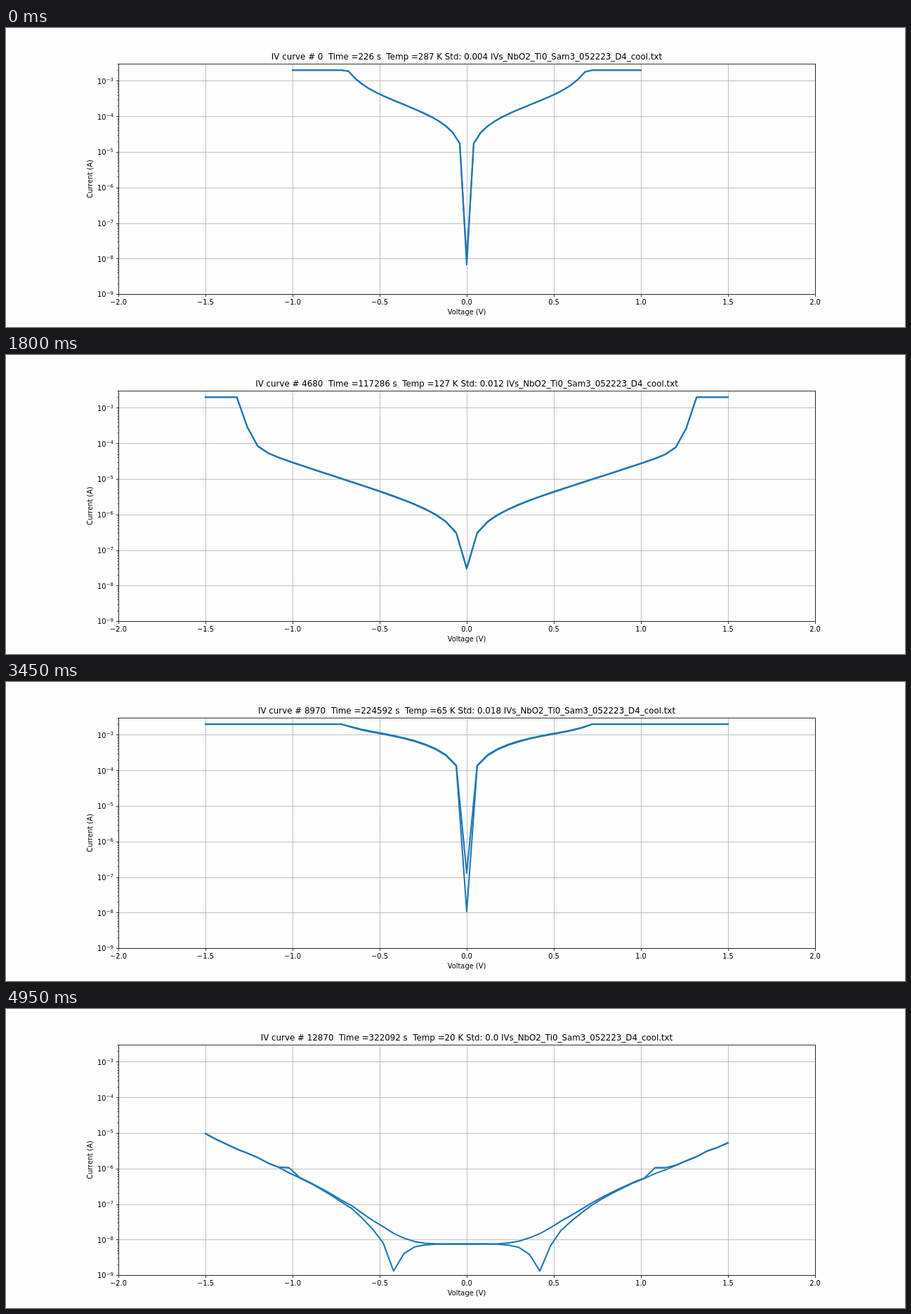
Write an HTML page with a canvas that moves like this. It is 1280 px wide and 427 px high and loops after 5 s.

```html
<!DOCTYPE html>
<html lang="en">
<head>
<meta charset="utf-8">
<title>IV curves</title>
<style>
  html, body { margin: 0; width: 100%; height: 100%; overflow: hidden; background: #fefefe; }
  canvas { display: block; }
</style>
</head>
<body>
<canvas id="plot" width="1280" height="427"></canvas>
<script>
const ctx = document.getElementById('plot').getContext('2d');
const LEFT = 160, RIGHT = 1152, TOP = 51.24, BOTTOM = 380.03;
const DECADE = (BOTTOM - TOP) / (Math.log10(3e-3) + 9);
const COMPLIANCE = Math.log10(2e-3);
const STEP_MS = 50, STEPS = 100;
const FONT = '"DejaVu Sans", sans-serif';

const toX = volts => 656 + 248 * volts;
const toY = logI => BOTTOM - (logI + 9) * DECADE;
const snap = value => Math.round(value) + .5;
const mix = (a, b, u) => a + (b - a) * u;
const noise = seed => {
  const s = Math.sin(seed * 12.9898) * 43758.5453;
  return s - Math.floor(s) - .5;
};

// Device conditions. Currents are log10: logG conductance, gap between the sweeps,
// zeroUp and zeroDown the readings at 0 V. Growth, power, threshold and softness shape the rise.
const fresh = { kelvin: 287, std: .004, logG: -3.365, gap: .006, growth: 2.2, power: 2,
                threshold: .6985, softness: .083, zeroUp: -8.17, zeroDown: -8.05, cold: 0 };
const cooler = { ...fresh, kelvin: 263, std: .014, logG: -3.606, growth: 2.3,
                 threshold: .7235, softness: .042, zeroUp: -7.82, zeroDown: -12 };
const insulating = { ...fresh, kelvin: 168, std: .012, logG: -4.8, gap: .015, growth: 1.7, power: 1.6,
                     threshold: 1.25, softness: .04, zeroUp: -7.51, zeroDown: -7.53 };
const formed = { ...fresh, kelvin: 85, std: .011, logG: -3.24, gap: .185, growth: .12,
                 threshold: .84, softness: .01, zeroUp: -7.46, zeroDown: -8.386 };
const metallic = { ...fresh, kelvin: 65, std: .018, logG: -2.635, gap: .02, growth: -.13, power: 1,
                   threshold: .78, softness: .06, zeroUp: -6.89, zeroDown: -7.97 };
const timeline = [
  { step: 0, ...fresh },
  { step: 12, ...cooler },
  { step: 28, ...insulating },
  { step: 36, ...insulating, kelvin: 127, logG: -5.3 },
  { step: 37, ...formed, kelvin: 122 },
  { step: 44, ...formed },
  { step: 68, ...formed, kelvin: 66, threshold: 1.02 },
  { step: 69, ...metallic },
  { step: 82, ...metallic, kelvin: 20, std: 0, cold: 1 }
];

// Each run sweeps its own voltage range; restarting adds a pause in seconds
const runs = [
  { start: 0, range: 1, pause: 0 },
  { start: 31, range: 1.5, pause: 60 },
  { start: 37, range: 1.8, pause: 117 },
  { start: 67, range: 2, pause: 116 },
  { start: 69, range: 1.5, pause: 116 }
];

function stateAt(step) {
  let i = 0;
  while (i < timeline.length - 2 && timeline[i + 1].step <= step) i++;
  const a = timeline[i], b = timeline[i + 1];
  const u = Math.min(1, (step - a.step) / (b.step - a.step));
  return Object.fromEntries(Object.keys(a).map(key => [key, mix(a[key], b[key], u)]));
}

function warmLog(state, down, volts) {
  if (!volts) return down ? state.zeroDown : state.zeroUp;
  const v = Math.abs(volts);
  const rise = state.growth * v ** state.power + Math.exp((v - state.threshold) / state.softness);
  const split = down ? state.gap * (1 - .4 * v) : 0;
  const skew = volts < 0 ? .03 * v : 0;
  return Math.min(COMPLIANCE, state.logG + Math.log10(v) + rise / Math.LN10 - split + skew);
}

// Power law with an exponential tail above 1 V, offset by a displacement current
// that adds to one sweep and cancels the other
function coldLog(down, volts, seed) {
  const v = Math.abs(volts), displacement = 7.5e-9;
  const [scale, power] = volts < 0 ? [6.9e-7, 5.2] : [4.8e-7, 4.8];
  const shape = v < 1 ? v ** power : Math.exp(power * (v - 1));
  const current = scale * shape * (1 + .08 * noise(seed));
  if (down) return Math.log10(Math.max(1.3e-9, Math.abs(current - displacement)));
  const rangeSwitch = current > 6.5e-7 && current < 1.05e-6;
  return Math.log10(rangeSwitch ? 1.05e-6 : current + displacement);
}

function line(x1, y1, x2, y2, color, width = .8) {
  ctx.strokeStyle = color;
  ctx.lineWidth = width;
  ctx.beginPath();
  ctx.moveTo(x1, y1);
  ctx.lineTo(x2, y2);
  ctx.stroke();
}

function text(string, x, y, size = 9.88, align = 'center') {
  ctx.font = `${size}px ${FONT}`;
  ctx.textAlign = align;
  ctx.fillStyle = '#000';
  ctx.fillText(string, x, y);
}

function drawGridAndTicks() {
  const left = snap(LEFT), right = snap(RIGHT), top = snap(TOP), bottom = snap(BOTTOM);
  for (let v = -2; v <= 2; v += .5) {
    const x = snap(toX(v));
    line(x, top, x, bottom, '#b0b0b0');
    line(x, bottom, x, bottom + 3.5, '#000');
    text(v.toFixed(1).replace('-', '−'), toX(v), 395);
  }
  for (let e = -9; e <= -3; e++) {
    const y = snap(toY(e));
    line(left, y, right, y, '#b0b0b0');
    line(left - 3.5, y, left, y, '#000');
    text('10', 142.6, toY(e) + 4.3, 9.88, 'right');
    text('−' + -e, 153, toY(e) + .5, 6.92, 'right');
    for (let m = 2; m <= (e === -3 ? 3 : 9); m++) {
      const minor = snap(toY(e + Math.log10(m)));
      line(left - 2, minor, left, minor, '#000', .6);
    }
  }
}

function drawFrame() {
  ctx.strokeStyle = '#000';
  ctx.lineWidth = .8;
  ctx.strokeRect(snap(LEFT), snap(TOP), RIGHT - LEFT, snap(BOTTOM) - snap(TOP));
}

function drawCurves(step, state, range) {
  ctx.save();
  ctx.beginPath();
  ctx.rect(LEFT, TOP, RIGHT - LEFT, BOTTOM - TOP);
  ctx.clip();
  ctx.strokeStyle = '#1f77b4';
  ctx.lineWidth = 2.1;
  ctx.lineJoin = 'round';
  ctx.lineCap = 'square';
  for (const down of [false, true]) {
    ctx.beginPath();
    for (let n = -25; n <= 25; n++) {
      const volts = n / 25 * range;
      const warm = warmLog(state, down, volts);
      const cold = coldLog(down, volts, step * 51 + n);
      ctx.lineTo(toX(volts), toY(mix(warm, cold, state.cold)));
    }
    ctx.stroke();
  }
  ctx.restore();
}

function drawLabels(step, state, pause) {
  const count = step * 130;
  const std = +state.std.toFixed(3) || '0.0';
  text(`IV curve # ${count}  Time =${226 + count * 25 + pause} s  Temp =${Math.round(state.kelvin)} K ` +
       `Std: ${std} IVs_NbO2_Ti0_Sam3_052223_D4_cool.txt`, 656, 45.3, 11.85);
  text('Voltage (V)', 656, 408.5);
  ctx.save();
  ctx.translate(123, 215.6);
  ctx.rotate(-Math.PI / 2);
  text('Current (A)', 0, 0);
  ctx.restore();
}

function draw() {
  const step = Math.floor(performance.now() / STEP_MS) % STEPS;
  const state = stateAt(step);
  const run = runs.findLast(r => r.start <= step);
  ctx.fillStyle = '#fefefe';
  ctx.fillRect(0, 0, 1280, 427);
  drawGridAndTicks();
  drawCurves(step, state, run.range);
  drawFrame();
  drawLabels(step, state, run.pause);
  requestAnimationFrame(draw);
}
draw();
</script>
</body>
</html>
```
